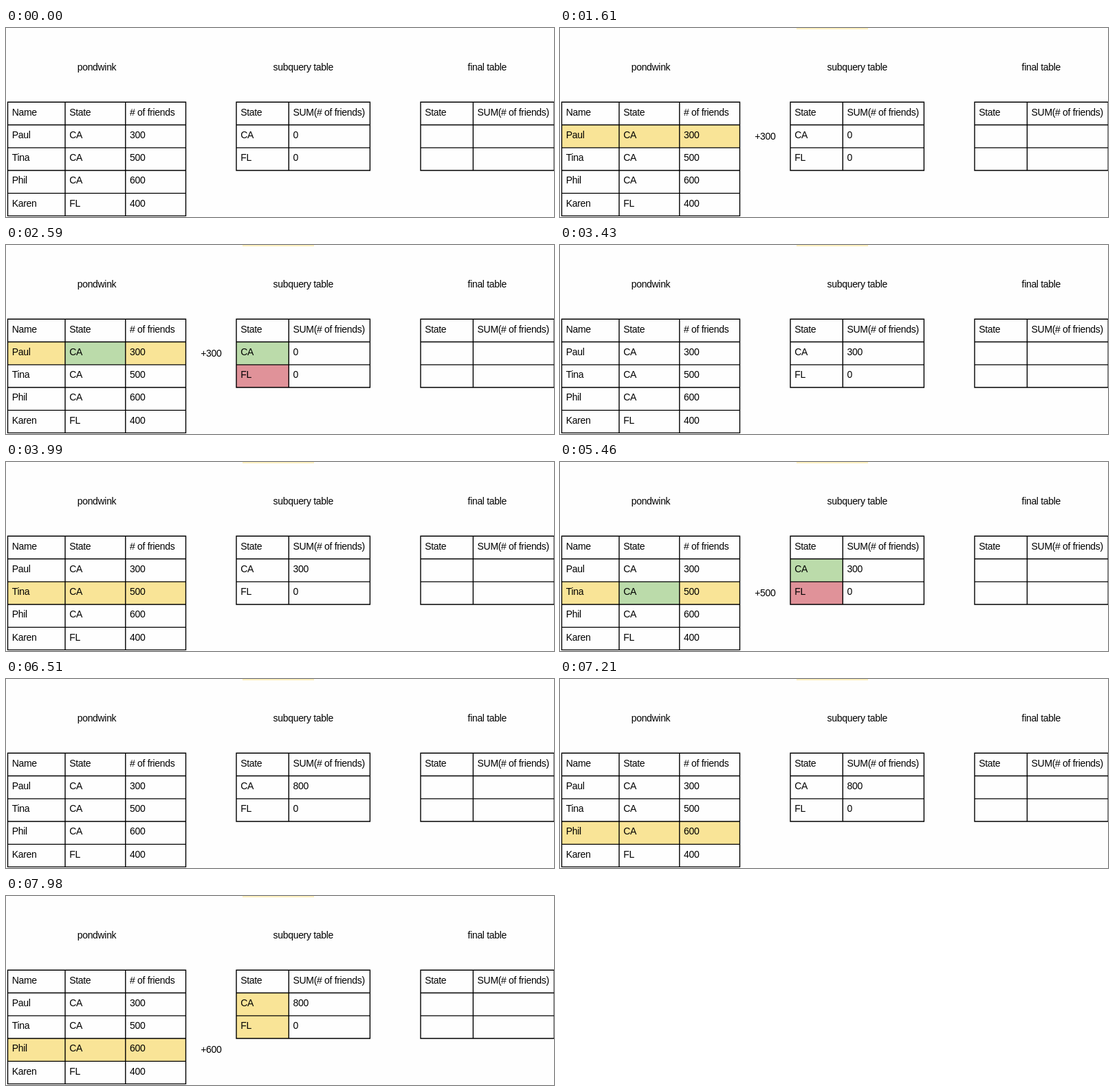
Recreate the animation shown at these times as an HTML page. Size 797x276 px, loop 8 s.

```html
<!DOCTYPE html>
<html lang="en">
<head>
<meta charset="utf-8">
<title>Grouped sum</title>
<style>
html, body { margin: 0; width: 100%; height: 100%; overflow: hidden; background: #fefefe; }
svg { display: block; }
text { font: 14px "Liberation Sans", Arial, sans-serif; letter-spacing: -0.32px; fill: #000; }
</style>
</head>
<body>
<svg id="stage" width="797" height="276" viewBox="0 0 797 276"></svg>
<script>
const stage = document.getElementById("stage");
const LOOP = 8000, STEP = 490;
const YELLOW = "#f9e497", GREEN = "#bbdbaa", RED = "#e09299";
const ROWS = [108.3, 141.5, 174.9, 208, 241.4, 274.4];
const BASE = [128, 161, 194, 227, 261];
const PEOPLE = [2.5, 86, 173.8, 261.5];
const SUMS = [335, 411.3, 529.4];
const FINAL = [603, 679.4, 797.2];

function add(tag, attrs, content = "") {
  const el = document.createElementNS("http://www.w3.org/2000/svg", tag);
  for (const key in attrs) el.setAttribute(key, attrs[key]);
  el.textContent = content;
  return stage.appendChild(el);
}

function cell(cols, c, r) {
  return add("rect", {
    x: cols[c], y: ROWS[r],
    width: cols[c + 1] - cols[c], height: ROWS[r + 1] - ROWS[r], fill: "none"
  });
}

function grid(cols, count) {
  const left = cols[0], right = cols[cols.length - 1];
  const top = ROWS[0], bottom = ROWS[count];
  let d = "";
  for (const x of cols) d += `M${x} ${top - 0.7}V${bottom + 0.7}`;
  for (const y of ROWS.slice(0, count + 1)) d += `M${left - 0.7} ${y}H${right + 0.7}`;
  add("path", { d, fill: "none", stroke: "#000", "stroke-width": 1.4 });
}

function label(x, y, content, anchor = "start") {
  return add("text", { x, y, "text-anchor": anchor }, content);
}

function table(cols, data, count) {
  grid(cols, count);
  return data.map((row, r) => row.map((s, c) => label(cols[c] + 6.2, BASE[r], s)));
}

const bar = add("rect", { x: 344, y: 0, width: 104, height: 2, fill: "#fdf0bf" });
const rowCells = [1, 2, 3].map(r => [0, 1, 2].map(c => cell(PEOPLE, c, r)));
const keyCells = [1, 2].map(r => cell(SUMS, 0, r));

label(132, 62, "pondwink", "middle");
label(432.3, 62, "subquery table", "middle");
label(699.8, 62, "final table", "middle");

table(PEOPLE, [
  ["Name", "State", "# of friends"],
  ["Paul", "CA", "300"],
  ["Tina", "CA", "500"],
  ["Phil", "CA", "600"],
  ["Karen", "FL", "400"]
], 5);
const sumText = table(SUMS, [["State", "SUM(# of friends)"], ["CA", "0"], ["FL", "0"]], 3)[1][1];
table(FINAL, [["State", "SUM(# of friends)"]], 3);
const plus = label(283.2, 163, "");

// Each pass: row, amount, compare, match, add, clear.
const STARTS = [980, 3920, 6930];
const AMOUNTS = [300, 500, 600];

function draw(t) {
  bar.setAttribute("visibility", t >= STEP ? "visible" : "hidden");
  let sum = 0, added = "", keys = ["none", "none"];
  STARTS.forEach((start, i) => {
    const phase = Math.floor((t - start) / STEP);
    const active = phase >= 0 && phase < 5;
    const match = active && phase >= 3;
    if (phase >= 4) sum += AMOUNTS[i];
    rowCells[i].forEach((el, c) =>
      el.setAttribute("fill", !active ? "none" : match && c === 1 ? GREEN : YELLOW));
    if (!active) return;
    if (phase >= 1) {
      added = "+" + AMOUNTS[i];
      plus.setAttribute("y", BASE[i + 1] + 2);
    }
    if (phase >= 2) keys = match ? [GREEN, RED] : [YELLOW, YELLOW];
  });
  keyCells.forEach((el, i) => el.setAttribute("fill", keys[i]));
  plus.textContent = added;
  sumText.textContent = sum;
}

let begin = null;
function tick(now) {
  if (begin === null) begin = now;
  draw((now - begin) % LOOP);
  requestAnimationFrame(tick);
}
draw(0);
requestAnimationFrame(tick);
</script>
</body>
</html>
```
